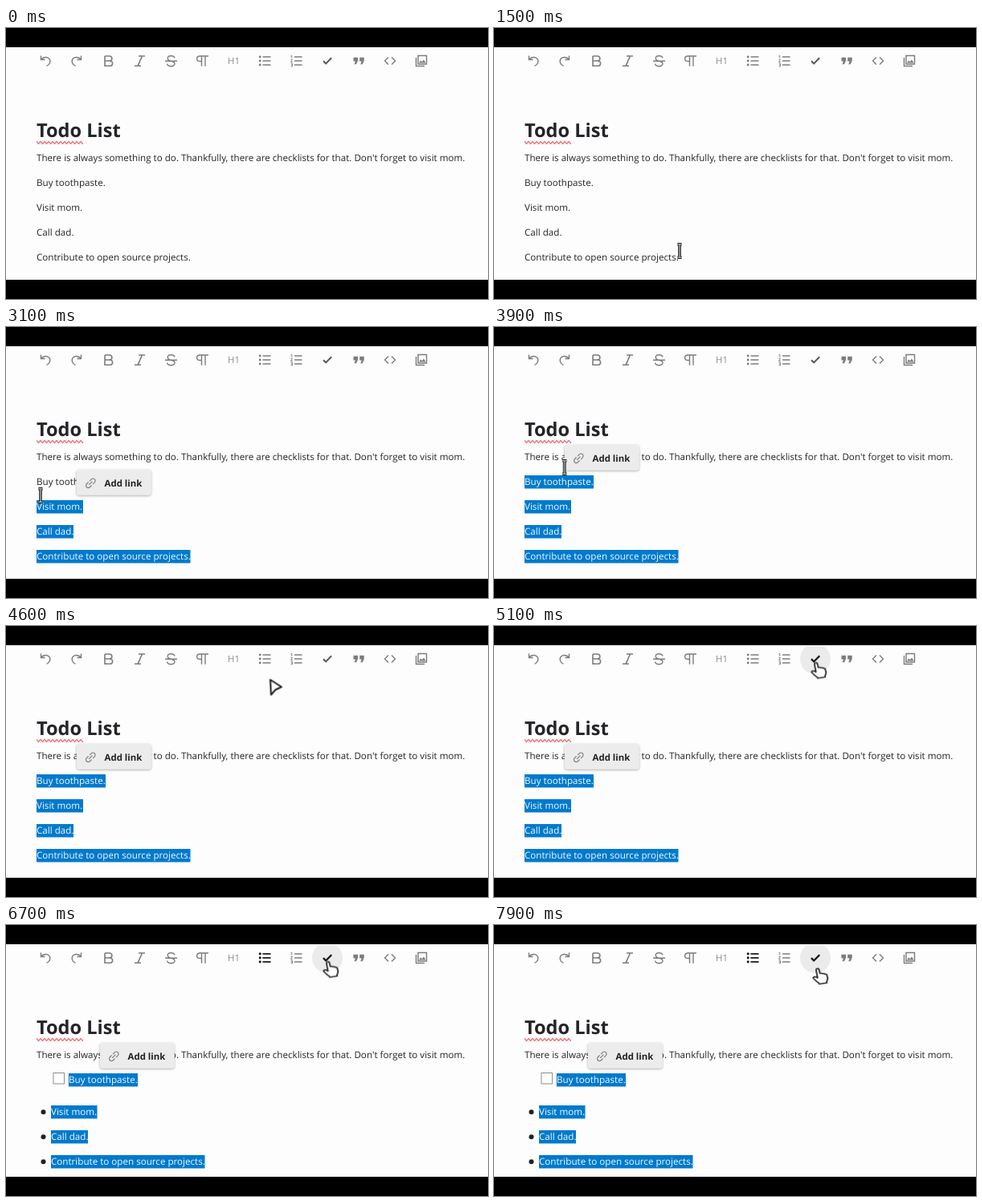
These frames come from a looping animation (600 by 338 pixels, 8 s). An HTML page:

```html
<!DOCTYPE html>
<html lang="en">
<head>
<meta charset="utf-8">
<title>Todo list editor</title>
<style>
html, body { margin: 0; height: 100%; overflow: hidden; background: #000; }
svg { display: block; width: 100vw; height: 100vh; }
text { font: 11.63px "Open Sans", "Noto Sans", sans-serif; text-rendering: geometricPrecision; }
.title { font-size: 23.6px; font-weight: 700; }
.small { font-size: 11.4px; }
.bold { font-size: 11.45px; font-weight: 700; }
.body { fill: #242428; }
.sel rect { fill: #007acc; }
.sel { fill: #f2f9fe; }
.icons { color: #7c7c7c; stroke: currentColor; fill: none; stroke-width: 1.4; }
.icons.dark { color: #151515; }
.solid { fill: currentColor; stroke: none; }

/* One loop is 8 s, so 100 ms is 1.25 %. */
.anim, .cursor * { animation: 8s step-end infinite; }
.row4 { animation-name: row4; }
.row3 { animation-name: row3; }
.row2 { animation-name: row2; }
.row1 { animation-name: row1; }
.before { animation-name: before; }
.after { animation-name: after; }
.popup { animation-name: popup; }
.hover { animation-name: hover; }
.tip { animation-name: tip; }
.cursor { animation-name: move; }
.cursor .beam { animation-name: beam; }
.cursor .arrow { animation-name: arrow; }
.cursor .hand { animation-name: hand; }

@keyframes row4 {
  0% { visibility: hidden; }
  31.25% { visibility: visible; clip-path: inset(0 0 0 74%); }
  32.5%, 100% { visibility: visible; clip-path: none; }
}
@keyframes row3 { 0% { visibility: hidden; } 32.5%, 100% { visibility: visible; } }
@keyframes row2 { 0% { visibility: hidden; } 37.5%, 100% { visibility: visible; } }
@keyframes row1 { 0% { visibility: hidden; } 40%, 100% { visibility: visible; } }
@keyframes before { 0% { opacity: 1; } 80%, 100% { opacity: 0; } }
@keyframes after { 0% { opacity: 0; } 80%, 100% { opacity: 1; } }
@keyframes popup {
  0% { visibility: hidden; transform: translate(0, 62px); }
  33.75% { visibility: visible; transform: translate(0, 62px); }
  38.75% { visibility: visible; transform: translate(0, 31px); }
  41.25% { visibility: visible; transform: none; }
  81.25%, 100% { visibility: visible; transform: translate(29px, 0); }
}
@keyframes hover { 0% { opacity: 0; } 61.25%, 100% { opacity: 1; } }
@keyframes tip {
  0% { opacity: 0; }
  72.5% { opacity: .2; }
  73.75% { opacity: .47; }
  75% { opacity: .9; }
  80% { opacity: .45; }
  81.25%, 100% { opacity: 0; }
}
@keyframes move {
  0% { transform: translate(231px, 278px); }
  20% { transform: translate(250px, 293px); }
  23.75% { transform: translate(251px, 293.5px); }
  25% { transform: translate(252px, 294px); }
  31.25% { transform: translate(180px, 284px); }
  32.5% { transform: translate(72px, 262px); }
  33.75% { transform: translate(42px, 250px); }
  37.5% { transform: translate(42px, 228px); }
  38.75% { transform: translate(43px, 210px); }
  40% { transform: translate(43px, 203px); animation-timing-function: steps(5, start); }
  46.25% { transform: translate(42px, 194px); }
  48.75% { transform: translate(42px, 194px); animation-timing-function: steps(4, start); }
  53.75% { transform: translate(225px, 118px); animation-timing-function: steps(4, start); }
  58.75% { transform: translate(335.5px, 76.5px); }
  60% { transform: translate(364px, 66px); }
  61.25% { transform: translate(394px, 58px); }
  62.5% { transform: translate(402px, 56px); }
  63.75% { transform: translate(404.5px, 55px); }
  98.75%, 100% { transform: translate(406.5px, 63.5px); }
}
@keyframes beam {
  0% { visibility: hidden; }
  18.75% { visibility: visible; }
  20% { visibility: hidden; }
  31.25% { visibility: visible; }
  50%, 100% { visibility: hidden; }
}
@keyframes arrow {
  0% { visibility: hidden; }
  20% { visibility: visible; }
  31.25% { visibility: hidden; }
  50% { visibility: visible; }
  61.25%, 100% { visibility: hidden; }
}
@keyframes hand { 0% { visibility: hidden; } 61.25%, 100% { visibility: visible; } }
</style>
</head>
<body>
<svg viewBox="0 0 600 338" preserveAspectRatio="none">
  <defs>
    <text id="buy" y="3.7">Buy toothpaste.</text>
    <text id="visit" y="3.7">Visit mom.</text>
    <text id="call" y="3.7">Call dad.</text>
    <text id="give" y="3.7">Contribute to open source projects.</text>
    <path id="undo" d="M-5.5-6.5V-1.5H-.5M-5.2-1.8C-2.5-5 3-5.6 5.2-2.2C7 1 5.2 5 1.5 6.3"/>
    <g id="bullets">
      <path d="M-2.5-5H7.5M-2.5 0H7.5M-2.5 5H7.5"/>
      <g class="solid"><circle cx="-5.8" cy="-5" r="1.4"/><circle cx="-5.8" r="1.4"/><circle cx="-5.8" cy="5" r="1.4"/></g>
    </g>
    <path id="check" d="M-5 .5L-1.8 3.7L5.2-3.4" stroke-width="2"/>
    <path id="mark" class="solid" d="M-6.5-4.2H-1V0L-3 4.2H-5.5L-4 .6H-6.5Z"/>
    <pattern id="wave" width="5" height="5" x="38" y="140.5" patternUnits="userSpaceOnUse">
      <path d="M-1.25 2.5L0 1L2.5 4L5 1L6.25 2.5" fill="none" stroke="#e0343c" stroke-width="1.1"/>
    </pattern>
    <filter id="shadow" x="-20%" y="-40%" width="140%" height="180%">
      <feDropShadow dx="0" dy="1" stdDeviation="1.8" flood-opacity=".35"/>
    </filter>
    <clipPath id="bar"><path d="M380 25H420V61H380Z"/></clipPath>
  </defs>

  <rect width="600" height="338"/>
  <rect y="24" width="600" height="290" fill="#fdfdfe"/>

  <g class="anim hover" clip-path="url(#bar)"><circle cx="400" cy="41" r="19" fill="#ebebeb"/></g>

  <g class="icons">
    <use href="#undo" x="49" y="41"/>
    <use href="#undo" transform="translate(88 41) scale(-1 1)"/>
    <path d="M123 35H128.5C133 35 133 41 128.5 41H123M128.5 41C134 41 134 47.3 128.5 47.3H123V35" stroke-width="1.6"/>
    <path d="M165 35H173M160 47.3H168M169.5 35L164 47.3" stroke-width="1.6"/>
    <path d="M198 41.3H213M210 37.5C209 33.8 201.3 33.8 201.3 37.7C201.3 39.6 203 40.7 205.5 41.3C208.5 42 210 43 210 44.7C210 48.7 201.3 48.7 200.5 44.6"/>
    <path d="M252 35H241.5C236.3 35 236.3 41.5 241.5 41.5H243.5M243.5 35V47.8M248 35V47.8"/>
    <use href="#bullets" x="322" y="41"/>
    <path d="M359 36H368.5M359 41H368.5M359 46H368.5"/>
    <path d="M354.5 35L355.8 34.2V37.8M354.5 39.5H356.5L354.5 42.5H356.8M354.5 44.3H356.5V47.8H354.5M355 46H356.5" stroke-width=".9"/>
    <use href="#check" x="400" y="40.7" stroke="#555"/>
    <use href="#mark" x="439" y="41"/>
    <use href="#mark" x="446.7" y="41"/>
    <path d="M476 36.5L471.5 41L476 45.5M480 36.5L484.5 41L480 45.5"/>
    <path d="M513 34.5H523.5V45H513ZM510.5 37V47.5H521"/>
    <path class="solid" d="M514 43.5L516.3 40.4L518 42.2L520 39.5L522.6 43.5Z"/>
  </g>
  <text class="small" x="276" y="45" fill="#8a8a8a">H1</text>
  <g class="icons dark">
    <use class="anim hover" href="#check" x="400" y="40.7"/>
    <use class="anim after" href="#bullets" x="322" y="41"/>
  </g>

  <g class="body">
    <text class="title" x="38" y="136.2">Todo List</text>
    <rect x="38" y="140.5" width="58" height="5" fill="url(#wave)"/>
    <text x="38" y="166.3">There is always something to do. Thankfully, there are checklists for that. Don't forget to visit mom.</text>
  </g>

  <g class="anim before">
    <g class="body">
      <use href="#buy" x="38" y="193.5"/>
      <use href="#visit" x="38" y="224.5"/>
      <use href="#call" x="38" y="255.5"/>
      <use href="#give" x="38" y="286.5"/>
    </g>
    <g class="sel">
      <g class="anim row1"><rect x="38" y="185" width="86" height="16.5"/><use href="#buy" x="38" y="193.5"/></g>
      <g class="anim row2"><rect x="38" y="216" width="58" height="16.5"/><use href="#visit" x="38" y="224.5"/></g>
      <g class="anim row3"><rect x="38" y="247" width="46" height="16.5"/><use href="#call" x="38" y="255.5"/></g>
      <g class="anim row4"><rect x="38" y="278" width="191.5" height="16.5"/><use href="#give" x="38" y="286.5"/></g>
    </g>
  </g>

  <g class="anim after">
    <rect x="59" y="184.5" width="13.5" height="13.5" fill="#fff" stroke="#8c8c8c"/>
    <g fill="#222"><circle cx="46.5" cy="233.3" r="3"/><circle cx="46.5" cy="264.3" r="3"/><circle cx="46.5" cy="295.3" r="3"/></g>
    <g class="sel">
      <rect x="78" y="185" width="86" height="16.5"/><use href="#buy" x="78" y="193.5"/>
      <rect x="56" y="225" width="57.5" height="16.5"/><use href="#visit" x="56" y="233.5"/>
      <rect x="56" y="256" width="46" height="16.5"/><use href="#call" x="56" y="264.5"/>
      <rect x="56" y="287" width="191.5" height="16.5"/><use href="#give" x="56" y="295.5"/>
    </g>
  </g>

  <g class="anim popup">
    <rect x="88" y="147" width="92.5" height="31.5" rx="3" fill="#ececec" filter="url(#shadow)"/>
    <g transform="translate(105.3 163.8) rotate(-45)" fill="none" stroke="#808080" stroke-width="1.2">
      <path d="M-1-2.8H-4.2A2.8 2.8 0 0 0-4.2 2.8H-1M1-2.8H4.2A2.8 2.8 0 0 1 4.2 2.8H1M-3 0H3"/>
    </g>
    <text class="bold" x="122.5" y="167.5" fill="#222">Add link</text>
  </g>

  <g class="anim tip">
    <rect x="403" y="65" width="63" height="33.5" rx="2" fill="#616161"/>
    <text x="412" y="86" fill="#fff" style="font-size:11.3px">ToDo list</text>
  </g>

  <g class="anim cursor" stroke-linejoin="round">
    <g class="beam" fill="none">
      <path d="M-2.6-8.2H2.6M0-8.2V8.2M-2.6 8.2H2.6" stroke="#1a1a1a" stroke-width="3.6"/>
      <path d="M-2.6-8.2H2.6M0-8.2V8.2M-2.6 8.2H2.6" stroke="#ddd" stroke-width="1.1"/>
    </g>
    <path class="arrow" d="M-6.5-9.5L7.5-.5L0 3L-5.5 9.3Z" fill="#fff" stroke="#1a1a1a" stroke-width="2"/>
    <path class="hand" transform="scale(1.15 .97)" d="M-4.8-7.6c-.4-2.2 2.6-2.8 3.1-.6l1.1 5c.8-.6 2-.6 2.5 .3c.9-.6 2-.3 2.5 .6c1-.4 2.1 0 2.4 1.1l.8 3.6c.4 2.2-.6 3.6-1 5.1l.2 1.4l-8 1.6l-.6-1.4c-1.8-1-3.6-3.6-5.6-5.6c-1.4-1.6 .6-3.2 2.2-2.2l2 1.2z" fill="#fff" stroke="#2a2a2a" stroke-width="1.6"/>
  </g>
</svg>
</body>
</html>
```
